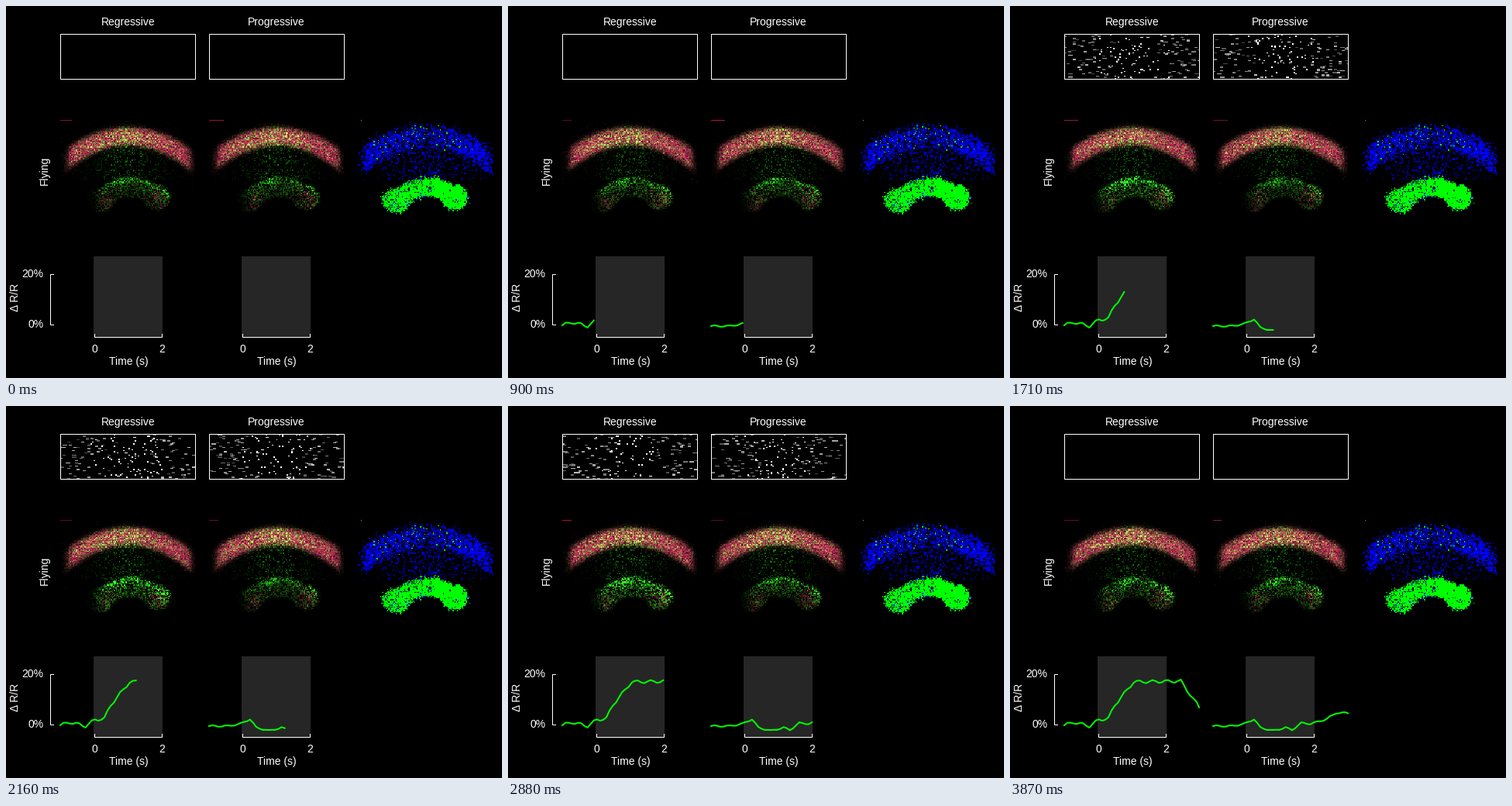
These frames come from a looping animation (640x480 px, 3960 ms). A matplotlib script:

```python
import numpy as np
import matplotlib.pyplot as plt
from matplotlib.animation import FuncAnimation
from matplotlib.patches import Rectangle

W, H, DPI = 640, 480, 100
FRAMES, STEP_MS = 44, 90
PX = 72 / DPI                      # one pixel in points
LEFTS = (70, 262, 454)             # left edge of each column
PANEL_W, TOP = 174, 147.5
COLS, ROWS = 128, 90
CELL = PANEL_W / COLS
DX = 4.07                          # trace advance per frame
ZERO_Y = 411
STIM_ON, STIM_OFF = 11, 32
RED = np.array([.92, .08, .42])
GREEN = np.array([.13, .9, .1])

plt.rcParams["font.family"] = "Liberation Sans"
plt.rcParams["font.size"] = 10


def trace(keys, wiggle):
    """Response height in pixels: key points joined, plus a small ripple."""
    n = np.arange(FRAMES)
    return np.interp(n, *zip(*keys)) + wiggle * np.sin(1.4 * n)


TRACES = (
    trace([(0, -1), (3, 3), (8, -2), (11, 6), (14, 8), (16, 25), (22, 55),
           (37, 56), (41, 32), (43, 23)], 2),
    trace([(0, -2), (6, -2), (10, 1), (13, 7), (15, -4), (19, -8), (23, -4),
           (25, -7), (28, 2), (31, 1), (36, 7), (39, 15), (43, 15)], 1),
)

# Cell centres in panel pixels
X, Y = np.meshgrid((np.arange(COLS) + .5) * CELL,
                   TOP + (np.arange(ROWS) + .5) * CELL)


def bell(x, y, size):
    return np.exp(-((X - x)**2 + (Y - y)**2) / size**2)


def bend(x, y, curve):
    """Signed distance below a parabola with its top at (x, y)."""
    u = X - x
    return (Y - y - curve * u**2) / np.sqrt(1 + (2 * curve * u)**2)


def ellipse(x, y, rx, ry):
    """Rough depth in pixels inside an ellipse."""
    return (1 - np.hypot((X - x) / rx, (Y - y) / ry)) * min(rx, ry)


def crescent(half, reach):
    ends = 1 / (1 + np.exp((np.abs(X - 89) - reach) / 2.5))
    return np.exp(-(np.abs(UPPER_D) / half)**4) * ends


UPPER_D = bend(88, 168.5, .0047)
ARC = crescent(12, 79)
LOWER_D = bend(91, 233.7, .0123)
band = np.where(np.abs(X - 91) < 42, 12.5 - np.abs(LOWER_D), -9)
band = np.where(Y < 262, band, -9)
DEPTH = np.maximum.reduce([band, ellipse(50, 251, 18, 15), ellipse(125, 247, 17, 16)])
LOWER = 1 / (1 + np.exp(-DEPTH / .8))
RIM = np.exp(-np.clip(LOWER_D + 11, 0, None) / 5)
LOBES = bell(57, 254, 13) + bell(127, 247, 13)
CENTRAL = np.exp(-((X - 80) / 45)**2)
GAP = (UPPER_D > 9) & (LOWER_D < -10) & (Y < 224)
FADE = 1 / (1 + np.exp((50 - X) / 4))

base = np.random.default_rng(7)
TEX = base.random((4, ROWS, COLS))  # fixed grain of the tissue


def brain(n, k):
    """Two-channel tissue picture: fixed grain mixed with shot noise."""
    rng = np.random.default_rng([n, k, 11])
    a, b, c, d = .5 * rng.random((4, ROWS, COLS)) + .5 * TEX
    e, f = rng.random((2, ROWS, COLS))
    gain = .9 + .01 * TRACES[k][n]

    r = ARC * (.2 + .35 * a + .55 * e) * (e + ARC > .5)
    g = 1.5 * ARC * b**2.2 * (.55 + .6 * CENTRAL)

    g += GAP * np.exp(-((X - 88) / 42)**2) * (c > .7) * (.1 + .45 * f)
    lit = LOWER * FADE * (d > .45)
    g += lit * gain * (.04 + .55 * f * d + .9 * RIM * f + .5 * bell(80, 228, 6))
    r += LOWER * FADE * (c > .4) * (.12 + .5 * LOBES) * e**1.5

    r += (f > .985) * np.exp(-(UPPER_D / 22)**2) * .3
    r[0, :rng.integers(8, 15)] = .4 + .4 * rng.random()
    return np.clip(r[..., None] * RED + g[..., None] * GREEN, 0, 1)


def region_map():
    """Blue and green region labels."""
    rng = np.random.default_rng(21)
    roll, spot, fill, rest = rng.random((4, ROWS, COLS))
    clump = np.kron(rng.random((30, 43)), np.ones((3, 3)))[:, :COLS]
    wide = crescent(14, 81)
    p = wide * (.45 + .3 * np.abs(X - 89) / 80) * (.6 + .9 * clump)
    p += .14 * GAP * np.exp(-((X - 90) / 62)**4)
    green = fill < LOWER * (.84 + .14 * (X > 95))
    blue = (roll < p) | ((LOWER > .3) & (rest < .2))
    img = np.zeros((ROWS, COLS, 3))
    img[blue] = 0, 0, 1
    img[green | (spot < .06 * CENTRAL * wide)] = 0, 1, 0
    img[0, 3] = 0, 1, 0
    return img


S_COLS, S_ROWS, DOTS, LIFE = 87, 40, 220, 8


def stimulus(n, k):
    """Star field flowing inward (k=0) or outward (k=1), blurred by speed."""
    img = np.zeros((S_ROWS, S_COLS))
    if not STIM_ON <= n <= STIM_OFF:
        return img
    flow = .09 if k else -.09
    for i in range(DOTS):
        cycle, age = divmod(n + i % LIFE, LIFE)
        rng = np.random.default_rng([i, cycle, k])
        u = rng.uniform(-1.1, 1.1) * np.exp(flow * (age - LIFE / 2))
        row, shade = rng.integers(S_ROWS), rng.uniform(.25, .75)
        col = int(np.floor((u + 1) / 2 * S_COLS))
        size = 1 + int(1.7 * abs(u) + .7 * rng.random())
        img[row, max(col, 0):max(col + size, 0)] = 1 if size == 1 else shade
    return img


fig = plt.figure(figsize=(W / DPI, H / DPI), dpi=DPI, facecolor="black")
ax = fig.add_axes([0, 0, 1, 1])


def picture(img, x0, x1, y0, y1, **kw):
    return ax.imshow(img, extent=(x0, x1, y1, y0), interpolation="nearest",
                     aspect="auto", **kw)


def tissue(img, x):
    return picture(img, x, x + PANEL_W, TOP, TOP + ROWS * CELL)


def path(xs, ys):
    ax.plot(xs, ys, color="white", lw=PX, solid_joinstyle="miter")


def label(x, y, text, **kw):
    style = dict(color="white", ha="center", va="baseline")
    ax.text(x, y, text, **{**style, **kw})


brains, fields, lines = [], [], []
for k, name in enumerate(("Regressive", "Progressive")):
    x = LEFTS[k]
    t0 = x + 44 - k
    label(x + 88 - k, 25, name)
    fields.append(picture(stimulus(0, k), x + 1, x + PANEL_W, 37, 94,
                          cmap="gray", vmin=0, vmax=1))
    ax.add_patch(Rectangle((x, 36), PANEL_W, 58, fill=False,
                           ec="white", lw=PX, zorder=3))
    brains.append(tissue(brain(0, k), x))
    ax.add_patch(Rectangle((t0 - 1, 323), 89, 104, fc="#262626", lw=0))
    path([t0, t0, t0 + 87, t0 + 87], [423, 427, 427, 423])
    label(t0 + .5, 447, "0")
    label(t0 + 87.5, 447, "2")
    label(x + 88 - k, 463, "Time (s)")
    lines += ax.plot([], [], color="#00ff00", lw=2 * PX, zorder=4)

tissue(region_map(), LEFTS[2])
path([61, 57, 57, 61], [346, 346, 411, 411])
label(48.5, 350, "20%", ha="right")
label(48.5, 415, "0%", ha="right")
label(50, 212, "Flying", rotation=90, va="center")
label(11.5, 375.5, "Δ R/R", rotation=90, va="center")

ax.set_xlim(0, W)
ax.set_ylim(H, 0)
ax.axis("off")


def update(n):
    for k in (0, 1):
        fields[k].set_data(stimulus(n, k))
        brains[k].set_data(brain(n, k))
        xs = LEFTS[k] + np.minimum(np.arange(n + 1) * DX, PANEL_W)
        lines[k].set_data(xs, ZERO_Y - TRACES[k][:n + 1])
    return fields + brains + lines


anim = FuncAnimation(fig, update, frames=FRAMES, interval=STEP_MS,
                     repeat=True, repeat_delay=0)
plt.show()
```
